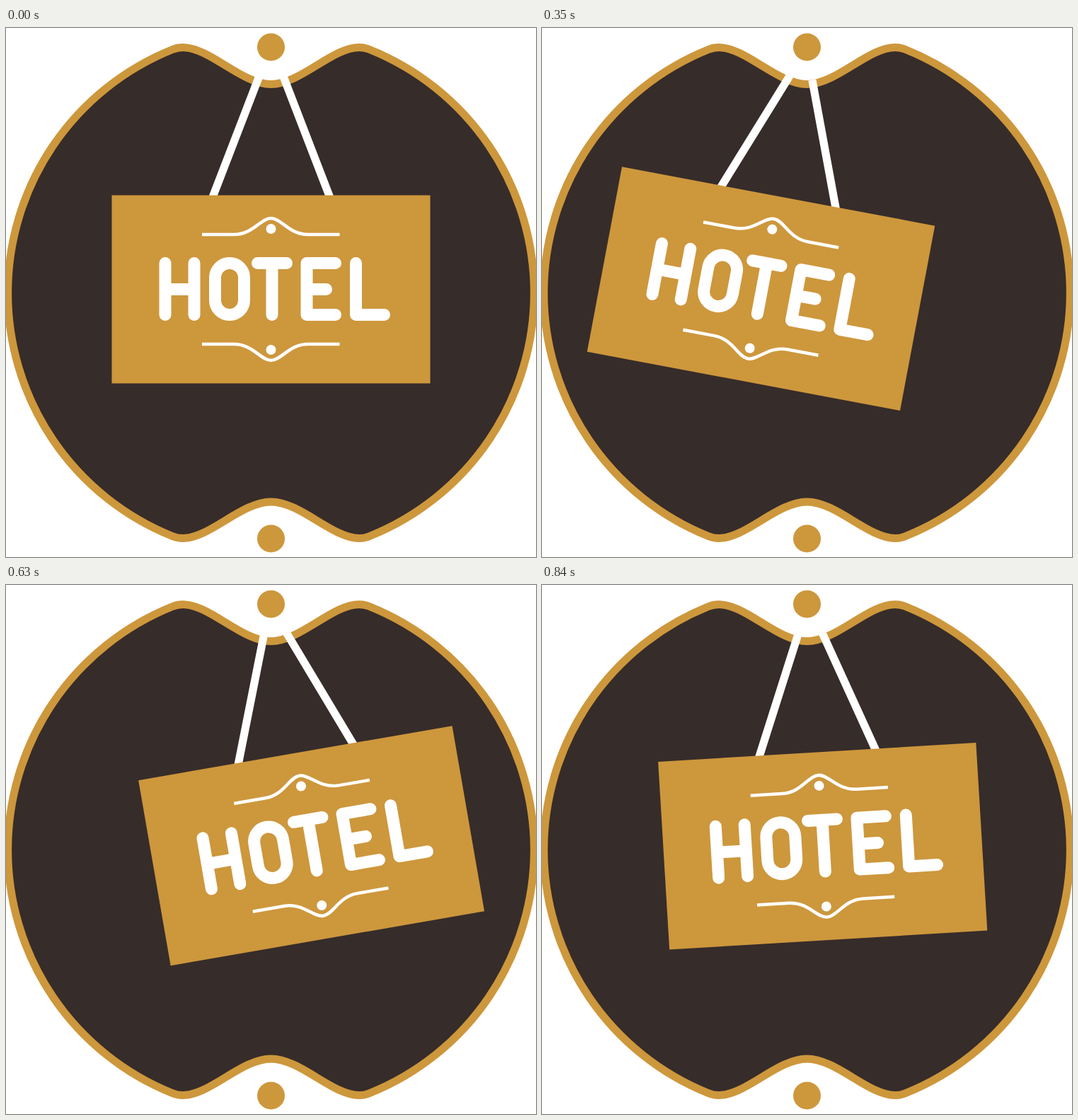
An HTML page for the animation above (910 ms loop, 749x748 px).

```html
<!DOCTYPE html>
<html lang="en">
<head>
<meta charset="utf-8">
<title>Swinging hotel sign</title>
<style>
  html, body { margin: 0; width: 100%; height: 100%; overflow: hidden; background: #fff; }
  svg { display: block; }
  .gold { fill: #cd973c; }
  .white { fill: #fff; }
  .line { fill: none; stroke: #fff; }
</style>
</head>
<body>
<svg width="749" height="748" viewBox="0 0 749 748" role="img" aria-label="HOTEL">
  <defs>
    <g id="ornament">
      <path class="line" stroke-width="4.5" d="M277 292H322C349 292 360 269 374.5 269S400 292 427 292H471.5"/>
      <circle class="white" cx="374.5" cy="284" r="7"/>
    </g>
  </defs>

  <path fill="#362c2a" stroke="#cd973c" stroke-width="11" d="
    M235 30.5Q242 27.5 250 27.5C288 27.5 333 79.5 374.5 79.5S461 27.5 499 27.5Q507 27.5 514 30.5
    A370.8 370.8 0 0 1 514 718.5Q507 721.5 499 721.5C461 721.5 416 670 374.5 670S288 721.5 250 721.5Q242 721.5 235 718.5
    A370.8 370.8 0 0 1 235 30.5Z"/>
  <circle class="gold" cx="374.5" cy="27" r="19.5"/>
  <circle class="gold" cx="374.5" cy="722" r="19.5"/>

  <g id="sign">
    <path class="line" stroke-width="11.2" d="M358.7 66L291.3 241M391 66L458.4 241"/>
    <path class="gold" d="M149.5 236.5h450v266h-450z"/>
    <use href="#ornament"/>
    <use href="#ornament" transform="matrix(1 0 0 -1 0 739)"/>
    <g class="line" stroke-width="17" stroke-linecap="round" stroke-linejoin="round">
      <path d="M225 332.5v73M266 332.5v73M225 369.5h41"/>
      <rect x="295.5" y="332.5" width="41" height="73" rx="20.5"/>
      <path d="M355.5 332.5h41M376 332.5v73"/>
      <path d="M465.5 332.5H425v73h40.5M425 369.5h27.5"/>
      <path d="M494.5 332.5v73h40"/>
    </g>
  </g>
</svg>
<script>
  const sign = document.getElementById('sign');
  const STEP = 70, STEPS = 13, SWING = 6;

  function draw(now) {
    const step = Math.max(Math.floor(now / STEP) % STEPS - 1, 0);
    const reach = 1 - Math.abs(step % SWING - SWING / 2) / (SWING / 2);
    const eased = reach * reach * (3 - 2 * reach);
    const travel = 0.72 * eased + 0.28 * reach;
    const [angle, shift] = step < SWING ? [14.4, -90.3] : [-13.3, 79.3];
    sign.setAttribute('transform',
      `translate(${shift * travel} ${-1.1 * eased}) rotate(${angle * eased} 374.5 369.5)`);
  }

  const start = performance.now();
  function tick() {
    draw(performance.now() - start);
    requestAnimationFrame(tick);
  }
  tick();
</script>
</body>
</html>
```
